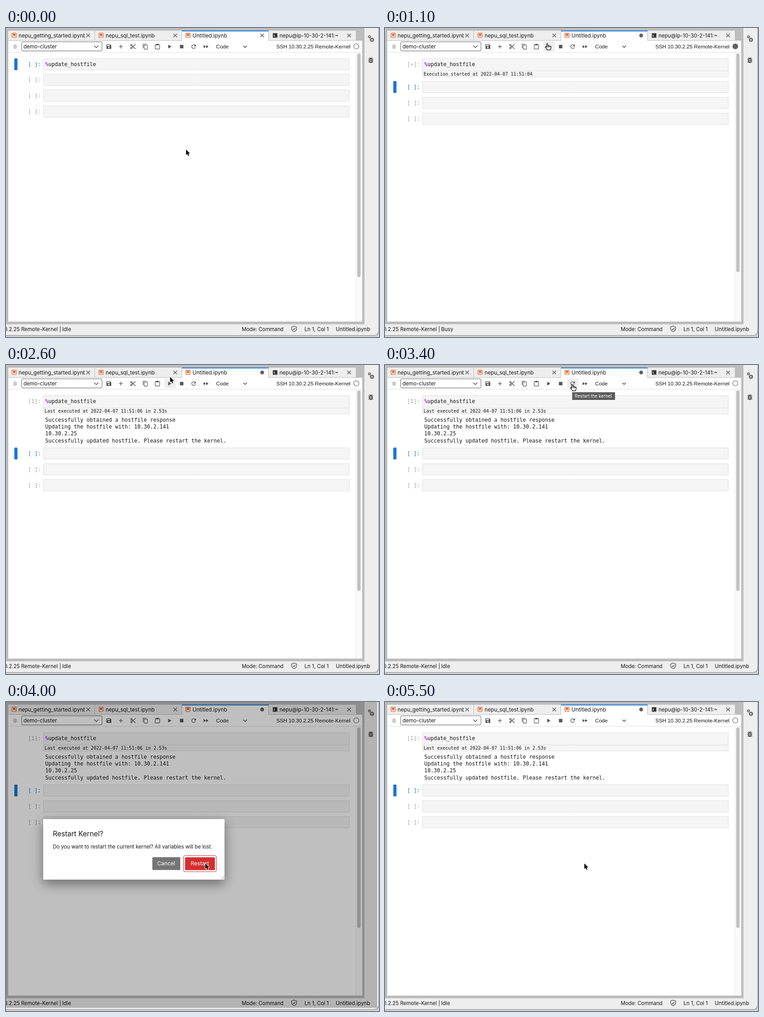
An HTML page with a canvas that plays this animation: 822 by 681 pixels, repeating every 6230 ms.

```html
<!DOCTYPE html>
<html lang="en">
<head>
<meta charset="utf-8">
<title>Notebook kernel restart</title>
<style>
html, body { margin: 0; width: 100%; height: 100%; overflow: hidden; background: #cfcfcf; }
canvas { display: block; width: 822px; height: 681px; }
</style>
</head>
<body>
<canvas id="stage" width="822" height="681"></canvas>
<script>
const ctx = document.getElementById('stage').getContext('2d');
const LOOP = 6230;
const UI = 'Inter, sans-serif';
const SANS = '"Liberation Sans", Arial, sans-serif';
const MONO = '"DejaVu Sans Mono", monospace';
const BLUE = '#1976d2', ICON = '#555', INK = '#161616';
const CELL = '#f5f5f5', EDGE = '#e0e0e0', PANEL = '#eeeeee', GREY = '#bdbdbd';

const ARROW = new Path2D('M0 0V12.2L2.8 9.7 4.7 14 6.8 13.1 4.9 9H8.7Z');
const HAND = new Path2D('M-1.6 9V1.2a1.4 1.4 0 0 1 2.8 0V6l.3-.8a1.3 1.3 0 0 1 2.5.4l.2.4a1.3 1.3 0 0 1 2.4.5l.2.3a1.2 1.2 0 0 1 2.2.8V10c0 2-1.4 3-1.6 5H0c-.6-2-3-4-4.4-6.2-.8-1.4 1-2.4 2-1.2z');
const MOVES = [
  { start: 100, end: 700, from: [396.8, 267.8], to: [357.5, 34.5], lift: 0 },
  { start: 2600, end: 3100, from: [357.5, 34.5], to: [413, 43], lift: 18 },
  { start: 3600, end: 4000, from: [413, 43], to: [439.3, 355.8], lift: 0 }
];
const OUTPUT = [
  'Successfully obtained a hostfile response',
  'Updating the hostfile with: 10.30.2.141',
  '10.30.2.25',
  'Successfully updated hostfile. Please restart the kernel.'
];

function rect(x, y, w, h, color) {
  ctx.fillStyle = color;
  ctx.fillRect(x, y, w, h);
}

function round(x, y, w, h, r, fill, stroke, width = 1) {
  ctx.beginPath();
  ctx.roundRect(x, y, w, h, r);
  if (fill) { ctx.fillStyle = fill; ctx.fill(); }
  if (stroke) { ctx.strokeStyle = stroke; ctx.lineWidth = width; ctx.stroke(); }
}

function text(str, x, y, size, family = UI, color = INK, align = 'left', weight = '') {
  ctx.font = `${weight} ${size}px ${family}`;
  ctx.fillStyle = color;
  ctx.textAlign = align;
  ctx.fillText(str, x, y);
}

function line(color, width, ...points) {
  ctx.beginPath();
  points.forEach(([x, y], i) => i ? ctx.lineTo(x, y) : ctx.moveTo(x, y));
  ctx.strokeStyle = color;
  ctx.lineWidth = width;
  ctx.stroke();
}

function shape(color, ...points) {
  ctx.beginPath();
  points.forEach(([x, y]) => ctx.lineTo(x, y));
  ctx.fillStyle = color;
  ctx.fill();
}

function circle(x, y, r, fill, stroke, width = 1) {
  ctx.beginPath();
  ctx.arc(x, y, r, 0, 2 * Math.PI);
  if (fill) { ctx.fillStyle = fill; ctx.fill(); }
  if (stroke) { ctx.strokeStyle = stroke; ctx.lineWidth = width; ctx.stroke(); }
}

function at(x, y, draw, scale = 1) {
  ctx.save();
  ctx.translate(x, y);
  ctx.scale(scale, scale);
  draw();
  ctx.restore();
}

const chevron = (x, y, r) => line(ICON, 1.5, [x - r, y - r / 2], [x, y + r / 2], [x + r, y - r / 2]);

function cross(x, y) {
  line(ICON, 1.2, [x - 4, y - 4], [x + 4, y + 4]);
  line(ICON, 1.2, [x + 4, y - 4], [x - 4, y + 4]);
}

function bug(color) {
  for (const y of [-2.6, 0.6, 3.8]) line(color, 1.4, [-5.2, y], [5.2, y]);
  line(color, 1.2, [-3, -6], [0, -3.5], [3, -6]);
  round(-3.6, -5, 7.2, 11, 3.6, color);
  rect(-1.4, -1.4, 2.8, 1.2, PANEL);
  rect(-1.4, 1.5, 2.8, 1.2, PANEL);
}

function gear(r) {
  circle(0, 0, r * 0.68, null, '#616161', r * 0.5);
  for (let i = 0; i < 8; i++) {
    ctx.rotate(Math.PI / 4);
    rect(-r * 0.2, -r * 1.25, r * 0.4, r * 0.45, '#616161');
  }
}

function notebookIcon(x) {
  const c = '#e4662f';
  round(x - 4.7, 11.5, 9.4, 9.4, 1, '#fff', c, 1.3);
  shape(c, [x - 2.8, 13], [x + 2.8, 13], [x + 2.8, 19], [x, 16.8], [x - 2.8, 19]);
}

function drawTabs(dirty) {
  rect(5, 6, 766, 22, PANEL);
  rect(5, 27, 780, 1, GREY);
  rect(195, 6, 1, 21, GREY);
  rect(387, 6, 1, 21, GREY);
  rect(388, 6, 190, 22, '#fff');
  rect(388, 5.5, 191, 2, BLUE);
  rect(578, 7, 1, 20, GREY);
  [18, 209.5, 401].forEach(notebookIcon);
  ctx.save();
  ctx.beginPath();
  ctx.rect(28, 6, 146, 21);
  ctx.clip();
  text('nepu_getting_started.ipynb', 27.8, 20.6, 11.7);
  ctx.restore();
  text('nepu_sql_test.ipynb', 219.6, 20.6, 11.65);
  text('Untitled.ipynb', 411, 20.6, 11.65);
  rect(588, 11.5, 10, 10, '#333');
  text('$_', 589, 19, 6.5, MONO, '#fff');
  text('nepu@ip-10-30-2-141:~', 602.8, 20.6, 11.5);
  [181, 373, 756].forEach(x => cross(x, 16.5));
  if (dirty) circle(564.5, 16.5, 4.2, '#616161'); else cross(564.5, 16.5);
}

function drawToolbar(hover, busy) {
  rect(5, 28, 780, 26, '#fff');
  rect(5, 53, 780, 1, EDGE);
  if (hover) rect(hover - 12, 30, 25, 21, PANEL);
  at(20, 41, () => bug('#c2c2c2'), 0.85);
  round(34.5, 30.5, 177, 20, 2.5, '#fff', '#616161');
  text('demo-cluster', 38.5, 44.8, 11.6);
  chevron(199, 41, 4.6);

  // save, add
  shape(ICON, [221.5, 36], [229.5, 36], [232, 38.5], [232, 46], [221.5, 46]);
  rect(223, 37.3, 5.8, 2.5, '#fff');
  circle(226.7, 43, 1.7, '#fff');
  line(ICON, 1.3, [249, 41], [257.5, 41]);
  line(ICON, 1.3, [253.2, 36.7], [253.2, 45.3]);

  // cut, copy, paste
  line(ICON, 1.5, [277, 38.8], [285.5, 46]);
  line(ICON, 1.5, [277, 43.2], [285.5, 36]);
  circle(276.3, 37.8, 1.7, null, ICON, 1.3);
  circle(276.3, 44.2, 1.7, null, ICON, 1.3);
  line(ICON, 1.2, [302.2, 44], [302.2, 35.5], [309.5, 35.5]);
  round(304.4, 37.6, 7.4, 9, 1, null, ICON, 1.2);
  round(328.8, 36.4, 9.8, 10, 1, null, ICON, 1.2);
  rect(331, 35, 5.4, 3.2, ICON);

  // run, stop, restart, run all
  shape(ICON, [357.5, 36.8], [364.5, 41], [357.5, 45.2]);
  rect(383.3, 37.2, 7.6, 7.6, ICON);
  ctx.beginPath();
  ctx.arc(413.5, 41, 4.1, 0.35, 5.5);
  ctx.strokeStyle = ICON;
  ctx.lineWidth = 1.3;
  ctx.stroke();
  shape(ICON, [418.5, 35.8], [418.5, 40.5], [413.8, 40.5]);
  shape(ICON, [435.5, 37.5], [440.6, 41], [435.5, 44.5]);
  shape(ICON, [441, 37.5], [446.2, 41], [441, 44.5]);

  text('Code', 463, 44.7, 11.63, SANS);
  chevron(527, 41, 3.8);
  text('SSH 10.30.2.25 Remote-Kernel', 759.2, 44.7, 11.63, SANS, INK, 'right');
  circle(772, 40.5, 5.7, busy ? '#616161' : '#fff', '#616161', 1.1);
}

function drawPrompt(label, y, active) {
  text(label, 76.8, y + 17, 11.63, MONO, active ? '#1f6fb5' : '#a0a0a0', 'right');
  if (active) round(18.3, y, 7, 26, 1.5, BLUE);
}

function drawCells(t) {
  const started = t >= 800, done = t >= 1800;
  drawPrompt(done ? '[1]:' : started ? '[\u2217]:' : '[ ]:', 67, !started);
  round(82.5, 67.5, 674, started ? 40.5 : 25, 0, CELL, EDGE);
  text('%', 86.5, 84, 11.63, MONO, '#aa22ff', 'left', 'bold');
  text('update_hostfile', 93.5, 84, 11.63, MONO);
  if (started) {
    rect(82, 94, 675, 1, EDGE);
    if (done && t < 2000) {
      ctx.globalAlpha = t < 1900 ? 1 : 0.5;
      rect(82, 94, 675, 14, '#c6e1f7');
      ctx.globalAlpha = 1;
    }
    const stamp = done ? 'Last executed at 2022-04-07 11:51:06 in 2.53s'
                       : 'Execution started at 2022-04-07 11:51:04';
    text(stamp, 85, 104.5, 9.98, MONO);
  }
  if (done) OUTPUT.forEach((s, i) => text(s, 86.5, 125 + i * 15.2, 11.63, MONO));

  const top = done ? 182.5 : started ? 117.5 : 101.8;
  for (let i = 0; i < 3; i++) {
    const y = Math.floor(top + i * 34.8);
    drawPrompt('[ ]:', y, started && i === 0);
    round(82.5, y + 0.5, 674, 25, 0, CELL, EDGE);
  }

  rect(771, 54, 14, 593, '#fafafa');
  rect(771, 54, 1, 593, '#e8e8e8');
  round(774, 56, 7.4, (done ? 498 : started ? 538 : 549) - 56, 3.7, '#c1c1c1');
}

function drawStatus(state) {
  text('SSH 10.30.2.25 Remote-Kernel |', 121.3, 667.8, 11.45, UI, INK, 'right');
  text(state, 123.8, 667.8, 11.45);
  text('Mode: Command', 519.5, 667.8, 11.35);
  at(635, 663, () => {
    ctx.strokeStyle = '#444';
    ctx.lineWidth = 1.2;
    ctx.stroke(new Path2D('M0-6L5.5-4V0C5.5 3 3 5 0 6.2-3 5-5.5 3-5.5 0V-4Z'));
    line('#444', 1.2, [-2.6, 0], [-0.6, 2], [2.8, -2]);
  });
  text('Ln 1, Col 1', 657.8, 667.8, 11.45);
  text('Untitled.ipynb', 726.8, 667.8, 11.5);
}

function drawDialog() {
  rect(0, 0, 818, 674, 'rgba(0,0,0,.25)');
  ctx.save();
  ctx.shadowColor = 'rgba(0,0,0,.45)';
  ctx.shadowBlur = 26;
  ctx.shadowOffsetY = 9;
  round(82, 258, 399.5, 133.5, 1.5, '#fff');
  ctx.restore();
  text('Restart Kernel?', 103.2, 296, 15.5);
  text('Do you want to restart the current kernel? All variables will be lost.', 103.2, 323, 11.25);
  round(322.5, 342, 61.5, 28.3, 1.5, '#757575');
  round(391.2, 338.5, 72.6, 35.5, 4, null, '#d32f2f', 1.1);
  round(394.5, 342.2, 66, 28.3, 1.5, '#d32f2f');
  text('Cancel', 353, 360.3, 12, UI, '#fff', 'center');
  text('Restart', 427.3, 360.3, 12, UI, '#fff', 'center');
  line('#777', 0.8, [474.5, 390.5], [480.5, 384.5]);
  line('#777', 0.8, [477.5, 390.5], [480.5, 387.5]);
}

function pointerAt(t) {
  let pos = MOVES[0].from;
  for (const { start, end, from, to, lift } of MOVES) {
    if (t < start) break;
    const p = Math.min(1, (t - start + 100) / (end - start + 100));
    const e = p * p * (3 - 2 * p);
    pos = [from[0] + (to[0] - from[0]) * e,
           from[1] + (to[1] - from[1]) * e - lift * Math.sin(Math.PI * p)];
  }
  return pos;
}

function drawPointer([x, y], hand) {
  at(x, y, () => {
    const path = hand ? HAND : ARROW;
    ctx.lineJoin = 'round';
    ctx.lineWidth = hand ? 1.3 : 1.8;
    ctx.strokeStyle = hand ? '#000' : '#fff';
    ctx.fillStyle = hand ? '#fff' : '#000';
    if (hand) ctx.fill(path);
    ctx.stroke(path);
    if (!hand) ctx.fill(path);
    if (hand) for (const fx of [1.3, 3.8, 6.3]) line('#000', 0.9, [fx, 6], [fx, 9]);
  }, hand ? 0.92 : 1);
}

function kernelState(t) {
  if (t >= 800 && t < 1800 || t >= 5300 && t < 5500) return 'Busy';
  return t >= 4100 && t < 4600 ? 'Restarting' : 'Idle';
}

function drawWindow() {
  rect(0, 0, 822, 681, '#cfcfcf');
  round(-20, -20, 841.5, 697.5, 10, PANEL, '#8c8c8c', 1.2);
  rect(0, 0, 790, 653, GREY);
  rect(5, 28, 780, 619, '#fff');
}

function render(time) {
  const t = Math.floor(time / 100) * 100;
  const state = kernelState(t);
  const pos = pointerAt(t);
  const hand = t >= 700 && t < 3500 && pos[1] > 28;
  const hover = t >= 700 && t < 2700 ? 361 : t >= 3000 && t < 3600 ? 413.5 : 0;

  drawWindow();
  drawTabs(t >= 800);
  drawToolbar(hover, state !== 'Idle');
  drawCells(t);
  at(801, 19.5, () => gear(2.9));
  at(806.5, 26, () => gear(4.1));
  at(804, 71, () => bug('#616161'), 1.05);
  drawStatus(state);
  if (t === 3400) {
    round(412.5, 60, 94.5, 17, 1, '#5c5c5c');
    text('Restart the kernel', 418, 72, 9.8, UI, '#fff');
  }
  if (t >= 3500 && t < 4100) drawDialog();
  drawPointer(pos, hand);
}

const origin = performance.now();
function tick() {
  render((performance.now() - origin) % LOOP);
  requestAnimationFrame(tick);
}
tick();
</script>
</body>
</html>
```
